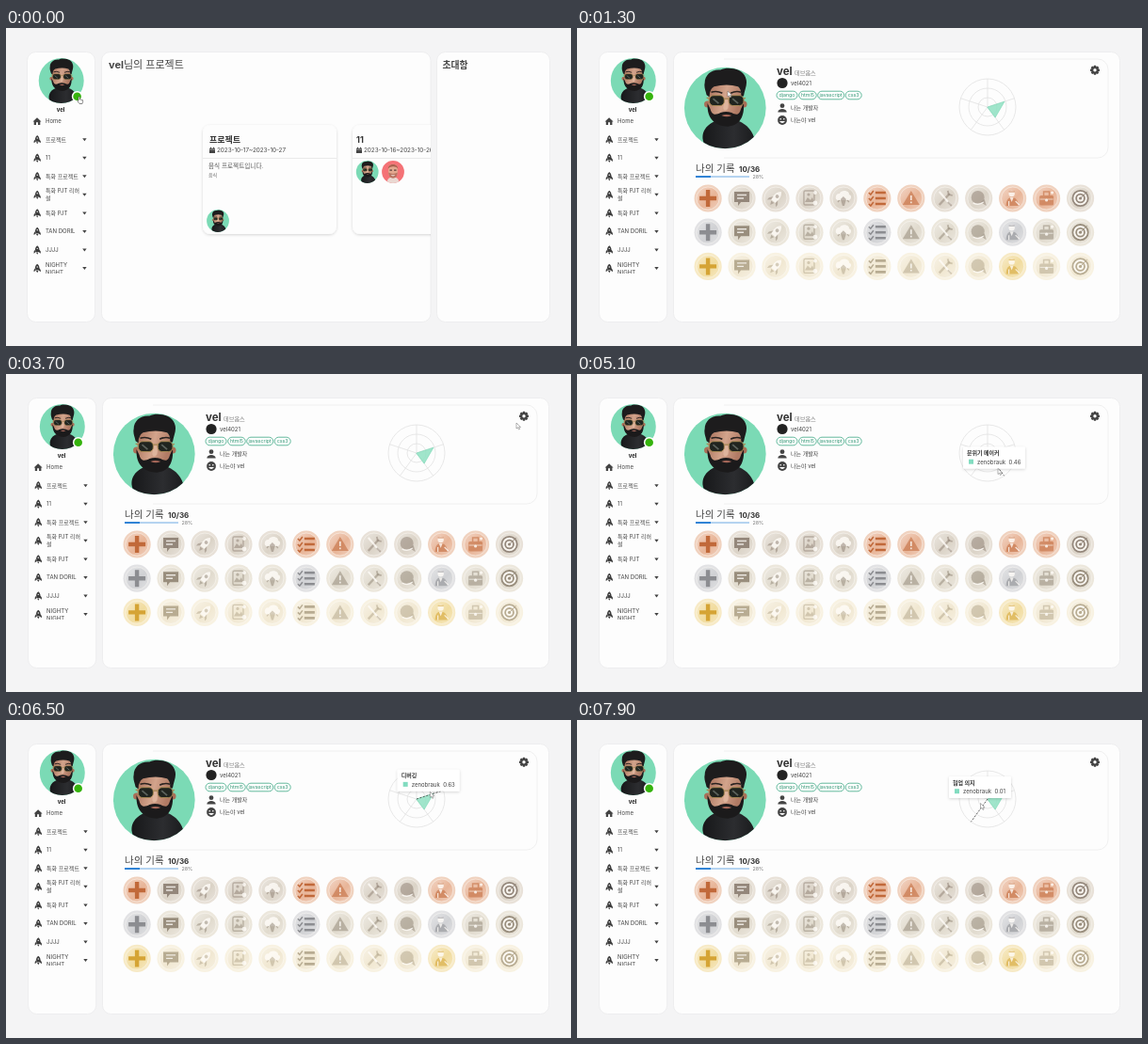
An HTML page for the animation above (8 s loop, 600 px wide and 338 px high).

```html
<!DOCTYPE html>
<html lang="ko">
<head>
<meta charset="utf-8">
<style>
html, body { margin: 0; width: 100%; height: 100%; overflow: hidden; background: #f4f4f5; }
svg { display: block; width: 100vw; height: 100vh; }
text { font-family: Inter, "Noto Sans CJK KR", "Noto Sans CJK", sans-serif; white-space: pre; }
</style>
</head>
<body>
<svg id="stage" viewBox="0 0 600 338"></svg>
<script>
const USER = 'vel', MEMBER = 'zenobrauk';

// Text placed by its vertical centre
const text = (x, cy, s, size, fill = '#444', weight = 400, anchor = 'start') =>
  `<text x="${x}" y="${cy + size * .36}" font-size="${size}" fill="${fill}" font-weight="${weight}" text-anchor="${anchor}">${s}</text>`;
const rect = (x, y, w, h, r, fill, more = '') =>
  `<rect x="${x}" y="${y}" width="${w}" height="${h}" rx="${r}" fill="${fill}" ${more}/>`;
const circle = (x, y, r, fill, more = '') =>
  `<circle cx="${x}" cy="${y}" r="${r}" fill="${fill}" ${more}/>`;
const path = (d, fill, more = '') => `<path d="${d}" fill="${fill}" ${more}/>`;
const line = (d, color, w, more = '') => path(d, 'none', `stroke="${color}" stroke-width="${w}" ${more}`);
const at = (x, y, s, scale = 1, turn = 0) =>
  `<g transform="translate(${x} ${y}) scale(${scale}) rotate(${turn})">${s}</g>`;
const panel = (x, w) => rect(x, 25.5, w, 287, 9, '#fdfdfd', 'stroke="#ebebec" stroke-width=".8"');

const defs = `<defs>
<clipPath id="disc"><circle r="44"/></clipPath>
<clipPath id="main"><rect x="101" y="25" width="350" height="288"/></clipPath>
<clipPath id="list"><rect x="22" y="92" width="74" height="169"/></clipPath>
<linearGradient id="shine" x2="1" y2="1"><stop stop-color="#fff" stop-opacity=".45"/>
<stop offset=".55" stop-color="#fff" stop-opacity="0"/><stop offset="1" stop-color="#fff" stop-opacity=".35"/></linearGradient>
<linearGradient id="skin" y2=".3"><stop stop-color="#a8705a"/><stop offset=".55" stop-color="#d3a48c"/><stop offset="1" stop-color="#b07a64"/></linearGradient>
<linearGradient id="shirt"><stop stop-color="#17181a"/><stop offset=".6" stop-color="#2c2d30"/><stop offset="1" stop-color="#1a1b1d"/></linearGradient>
<filter id="soft" x="-20%" y="-20%" width="140%" height="150%"><feDropShadow dx="0" dy="1" stdDeviation="1.6" flood-opacity=".16"/></filter>
</defs>`;

const bearded = circle(0, 0, 44, '#7bdab5') + `<g clip-path="url(#disc)">` +
  path('M-19 44C-29 33-24 19-10 14H14C25 18 34 29 32 44Z', 'url(#shirt)') +
  circle(-19, -4, 3.6, '#a96f58') + circle(20, -4, 3.6, '#a96f58') +
  path('M-18-14C-17-25-9-27 0-27C11-27 18-24 18-13V4C16 15-16 15-18 4Z', 'url(#skin)') +
  path('M-20-14C-21-19-23-22-22-27C-22-36-14-42-5-41C2-45 19-43 22-33C25-26 21-20 20-13L17-12Q18-20 14-23Q2-27-12-23Q-17-20-17-12Z', '#1d1c1d') +
  path('M-19-5L-16 1C-14 9-9 7-5 5Q1 3 7 5C11 7 15 9 17 1L20-5C21 9 16 19 3 20C-10 20-20 12-19-5Z', '#1b1a1b') +
  path('M-4 8Q1 6 7 8Q2 11-4 8', '#a8685a') +
  path('M0-9Q-4 2 0 2.5Q5 2.5 3-9Z', '#deb49c') +
  line('M-15-17Q-9-19-3-16M6-16Q12-19 17-17', '#2a2220', 1.7) +
  `<g stroke="#a88a55" stroke-width="1">` + rect(-17, -13.5, 16, 11, 4.5, '#20241f') + rect(4, -13.5, 16, 11, 4.5, '#20241f') + '</g>' +
  line('M-1-10H4M-17-10L-20-11M20-10L22-11', '#a88a55', 1.2) +
  line('M-13-10L-7-5M8-10L14-5', '#5c625c', 1.8) + '</g>';

const redhead = circle(0, 0, 44, '#f47276') + `<g clip-path="url(#disc)">` +
  path('M-25 44C-22 22-10 20 0 20S22 22 25 44Z', '#ead8d2') +
  path('M-18-16C-17-36 17-36 18-16V6C15 26-15 26-18 6Z', '#e2a88f') +
  path('M-19-12C-21-36 21-36 19-12C12-24-10-24-19-12', '#aa5f4e') +
  path('M-18 2Q0 12 18 2Q16 25 0 25Q-16 25-18 2', '#b97562') +
  line('M-13-7H-4M4-7H13', '#553b38', 4) + line('M-6 13Q0 16 6 13', '#fff', 3) + '</g>';

const rocket = path('M0-5C2.8-3 2.8 0 2.2 2.5H-2.2C-2.8 0-2.8-3 0-5ZM-2.4-.4L-4 2V4.3L-2 2.8ZM2.4-.4L4 2V4.3L2 2.8ZM-1.4 3H1.4L0 5.4Z', '#3c3c3c') +
  circle(0, -1.6, .8, '#fdfdfd');
const calendar = path('M-3-2.2H3V3H-3ZM-2-3.2H-1V-2H-2ZM1-3.2H2V-2H1Z', '#444') + line('M-3-.9H3', '#fff', .5);

function sidebar() {
  const rows = [['프로젝트'], ['11'], ['특화 프로젝트'], ['특화 PJT 리허', '설'], ['특화 PJT'], ['TAN DORIL'], ['JJJJ'], ['NIGHTY', 'NIGHT']];
  const items = rows.map((words, i) => {
    const y = 118.5 + i * 19.55;
    return at(33.2, y, rocket, .9) + path(`M81.2 ${y - 1.3}h4.4l-2.2 3z`, '#444') +
      words.map((w, k) => text(42, y + (words.length - 1) * (k * 8 - 4), w, 6)).join('');
  }).join('');
  return panel(22.5, 72) + at(58.7, 56, bearded, .545) + circle(75.6, 72.7, 5.8, '#fff') +
    circle(75.6, 72.7, 4.3, '#35b30c') + text(58, 87, USER, 6, '#222', 700, 'middle') +
    path('M28.5 99.5L33 95.2L37.5 99.5H36.3V103H34V100.3H32V103H29.7V99.5Z', '#444') +
    text(42, 99, 'Home', 6) + `<g clip-path="url(#list)">${items}</g>`;
}

function card(x, title, dates, dx) {
  return rect(x, 103, 142, 116, 8, '#fdfdfd', 'filter="url(#soft)"') + line(`M${x} 138.5h142`, '#e2e2e2', .7) +
    text(x + dx, 119, title, 9, '#333', 700) + at(x + dx + 3, 130, calendar) + text(x + dx + 8, 130, dates, 6.3);
}

function projects() {
  return panel(101.5, 349.5) + panel(457.5, 120) +
    text(109, 39, `<tspan font-weight="700">${USER}</tspan>님의 프로젝트`, 11) +
    text(463.5, 39, '초대함', 9.8, '#444', 700) + '<g clip-path="url(#main)">' +
    card(209, '프로젝트', '2023-10-17~2023-10-27', 7) +
    text(215, 147, '음식 프로젝트입니다.', 6.6, '#555') + text(215, 156.5, '음식', 5, '#666') +
    at(225, 205, bearded, .27) + card(368, '11', '2023-10-16~2023-10-26', 4) +
    at(383.7, 153, bearded, .27) + at(411, 153, redhead, .27) + '</g>';
}

const W = '#fffdf8c8';
const icons = [
  c => line('M0-9V9M-9 0H9', c, 4.4),
  c => path('M-8-7H8V4H-1L-4 8V4H-8Z', c) + line('M-5-3.5H5M-5 0H2', W, 1.4),
  c => at(0, 0, path('M0-9C4-6 4 0 3 4H-3C-4 0-4-6 0-9Z', W) + path('M-3 0L-6 4V7L-3 4ZM3 0L6 4V7L3 4ZM-2 5H2L0 9Z', c) + circle(0, -2.5, 1.9, c), 1, 40),
  c => rect(-6, -8, 11, 15, 1.5, 'none', `stroke="${c}" stroke-width="1.4"`) + path('M-5 4L-2-1L1 2L3-1L5 4Z', c) +
    circle(-1, -4, 1.6, c) + circle(6, -6, 2, W) + circle(6, 5, 2.4, W),
  c => path('M-6 2C-10 1-8-6-4-5C-2-10 7-8 6-4C10-3 8 3 4 2Z', W) + path('M-3 1L0-2L3 1L1 8H-1Z', c) + line('M-6 4L-4 2M6 4L4 2', c, 1.2),
  c => line('M-2-6H9M-2 0H9M-2 6H9', c, 2.6) + line('M-9-6L-7-4L-4-8M-9 0L-7 2L-4-2M-9 6L-7 8L-4 4', c, 1.5),
  c => path('M0-8L9 7H-9Z', c) + line('M0-3V2M0 3.6V5.2', W, 1.7),
  c => line('M-6 7L5-5', c, 2.4) + line('M-6-7L6 7', W, 2) + line('M3-8L4-4L8-3M3 4L7 8', c, 1.8),
  c => circle(-1, -1, 7, c) + path('M2 4L8 8L6 1Z', c) + line('M-6 5Q0 8 5 4', W, 1.5),
  c => circle(-1, -5, 3.2, W) + path('M-7 8C-7 0-3-1-1-1S6 0 6 8Z', c) + path('M-3-1L-1 4L1-1Z', W) + line('M-4 8V3M3 3L7 7', W, 1.2) + line('M2-7H-4', c, 1.4),
  c => rect(-7.5, -3, 15, 10.5, 1.5, c) + line('M-3-3V-7H3V-3', c, 1.5) + line('M-7 1H7', W, .8) + circle(0, 2, 1.6, W) + circle(6, -6, 1.6, W),
  c => circle(0, 0, 8.2, W, `stroke="${c}" stroke-width="1.8"`) + circle(0, 0, 4.4, 'none', `stroke="${c}" stroke-width="1.8"`) +
    circle(0, 0, 1.6, c) + line('M0 0L7-7', c, 1)
];
const bold = [0, 1, 5, 11];
// Per row: earned badges, earned colours, locked colours (rim, face, icon)
const tiers = [
  [[0, 5, 6, 9, 10], ['#f0d2bf', '#e8b598', '#c1693a'], ['#e8e1d8', '#dbd3c7', '#94877b']],
  [[0, 5, 9], ['#e2e2e4', '#d0d1d4', '#8c8d91'], ['#ece7dc', '#e1dbce', '#998e7d']],
  [[0, 9], ['#f7eac6', '#f1dc9f', '#d5a435'], ['#f8f2e2', '#f1e8d2', '#b8ac92']]
];
const badges = () => tiers.map(([won, on, off], row) => icons.map((icon, i) => {
  const [rim, face, ink] = won.includes(i) ? on : off;
  return at(139.1 + i * 35.95, 181 + row * 36.2, circle(0, 0, 14.6, rim) + circle(0, 0, 12, face, `stroke="${W}" stroke-width=".6"`) +
    circle(0, 0, 12, 'url(#shine)') + icon(bold.includes(i) ? ink : ink + '90'));
}).join('')).join('');

const CX = 436, CY = 84, R = 30;
const skills = [['개발', 0], ['디버깅', .63], ['분위기 메이커', .46], ['협업 의지', .01], ['일정 관리', 0]];
const spoke = (i, v) => [CX + R * v * Math.sin(i * Math.PI * .4), CY - R * v * Math.cos(i * Math.PI * .4)];

function radar() {
  return [10, 20, 30].map(r => circle(CX, CY, r, 'none', 'stroke="#dedede" stroke-width=".7"')).join('') +
    skills.map((s, i) => line(`M${CX} ${CY}L${spoke(i, 1)}`, '#dedede', .7)).join('') +
    path('M' + skills.map(([, v], i) => spoke(i, v)).join('L') + 'Z', '#8fe0c2', 'fill-opacity=".85" stroke="#7bd8b6" stroke-width=".6"');
}

function profile() {
  const chips = [['django', 212, 22], ['html5', 235.7, 18.5], ['javascript', 255.7, 28], ['css3', 285.2, 17]];
  const teeth = Array.from({ length: 8 }, (_, i) => at(0, 0, rect(-1.2, -5, 2.4, 3, .5, '#444'), 1, i * 45)).join('');
  return panel(102.5, 474) + rect(116, 33, 448, 105, 11, '#fdfdfd', 'stroke="#ececec" stroke-width=".8"') +
    rect(112, 30, 44, 112, 0, '#fdfdfd') + at(157.3, 85, bearded, .985) +
    text(212, 46, USER, 11.5, '#333', 700) + text(231, 47.5, '데브옵스', 6.2, '#777') +
    circle(218, 58.5, 5.6, '#222') + text(227, 58.5, USER + '4021', 6) +
    chips.map(([s, x, w]) => rect(x, 67.2, w, 8.6, 4.3, '#fff', 'stroke="#3ba883" stroke-width=".8"') +
      text(x + w / 2, 71.3, s, 5.3, '#319674', 400, 'middle')).join('') +
    circle(218, 82.7, 2.4, '#444') + path('M213.3 89.5C213.3 84.8 222.7 84.8 222.7 89.5Z', '#444') +
    text(227, 85, '나는 개발자', 6) +
    circle(218, 98, 4.9, '#444') + circle(216.2, 96.7, .8, '#fff') + circle(219.8, 96.7, .8, '#fff') + path('M215 99H221Q218 103 215 99', '#fff') +
    text(227, 98, '나는야 ' + USER, 6) +
    at(550, 44.8, circle(0, 0, 3.9, '#444') + teeth + circle(0, 0, 1.7, '#fdfdfd')) + radar() +
    text(126, 149, '나의 기록', 10.5) + text(172, 150, '10/36', 8, '#333', 700) +
    rect(126, 157.2, 57, 1.7, 0, '#a9cdef') + rect(126, 157.2, 16, 1.7, 0, '#1976d2') +
    text(186.5, 158, '28%', 5.4, '#777') + badges();
}

// Pointer route: time, x, y
const route = [[0, 77, 73], [400, 77, 73], [700, 112, 78], [1000, 140, 76], [1300, 160, 67], [1800, 340, 100], [2700, 400, 122],
  [3200, 470, 120], [3600, 531, 58], [3700, 542, 52], [4000, 541, 54], [4500, 482, 124], [4800, 446, 128], [5000, 443, 105.5],
  [5100, 447, 100.5], [5500, 449, 94], [5900, 448, 86.5], [6000, 447, 82], [6300, 447, 85], [6600, 452, 72], [6800, 444, 62],
  [7000, 436, 70], [7100, 430, 70], [7500, 424, 80], [7800, 428, 88], [8000, 429, 89]];
function pointer(t) {
  const i = Math.max(1, route.findIndex(k => k[0] >= t));
  const [a, x, y] = route[i - 1], [b, u, v] = route[i], p = (t - a) / (b - a);
  return [x + (u - x) * p, y + (v - y) * p];
}

// The tooltip trails the pointer by one tenth of a second
function hover(t) {
  const [x, y] = pointer(t);
  if (Math.hypot(x - CX, y - CY) > R) return '';
  const i = (Math.round(Math.atan2(x - CX, CY - y) / (Math.PI * .4)) + 5) % 5;
  const [px, py] = pointer(t - 100);
  const [name, value] = skills[i];
  return line(`M${CX} ${CY}L${spoke(i, 1)}`, '#444', .8, 'stroke-dasharray="2 1.6"') +
    at(px - 33, py - 28, rect(0, 0, 66, 23, 1, '#fff', 'filter="url(#soft)"') + text(4, 6.5, name, 6, '#333', 700) +
      rect(6, 13.2, 5, 5, 0, '#82dcc0') + text(15, 16, MEMBER, 6) + text(48.5, 16, value.toFixed(2), 6));
}

const arrow = path('M0 0V6L1.5 4.8L2.5 7L3.6 6.5L2.6 4.4H4.5Z', '#fff', 'stroke="#666" stroke-width=".5"');
const hand = path('M0 .5Q.8-.5 1.5.5V3L4.5 3.6Q5 5.5 4 7.5H1L-1.2 4.6Q-.7 3.8 0 4.4Z', '#fff', 'stroke="#444" stroke-width=".6"');

const stage = document.getElementById('stage');
stage.innerHTML = defs + rect(0, 0, 600, 338, 0, '#f4f4f5') +
  `<g id="side">${sidebar()}</g><g id="home">${projects()}</g><g id="me">${profile()}</g><g id="live"></g>`;
const [side, home, me, live] = ['side', 'home', 'me', 'live'].map(id => document.getElementById(id));

function draw(now) {
  const t = Math.floor(now % 8000 / 100) * 100, opened = t >= 400;
  side.setAttribute('transform', `translate(${opened ? 1.1 : 0} 0)`);
  home.style.display = opened ? 'none' : '';
  me.style.display = opened ? '' : 'none';
  live.innerHTML = (opened ? hover(t) : '') + at(...pointer(t), opened ? arrow : hand);
  requestAnimationFrame(draw);
}
requestAnimationFrame(draw);
</script>
</body>
</html>
```
